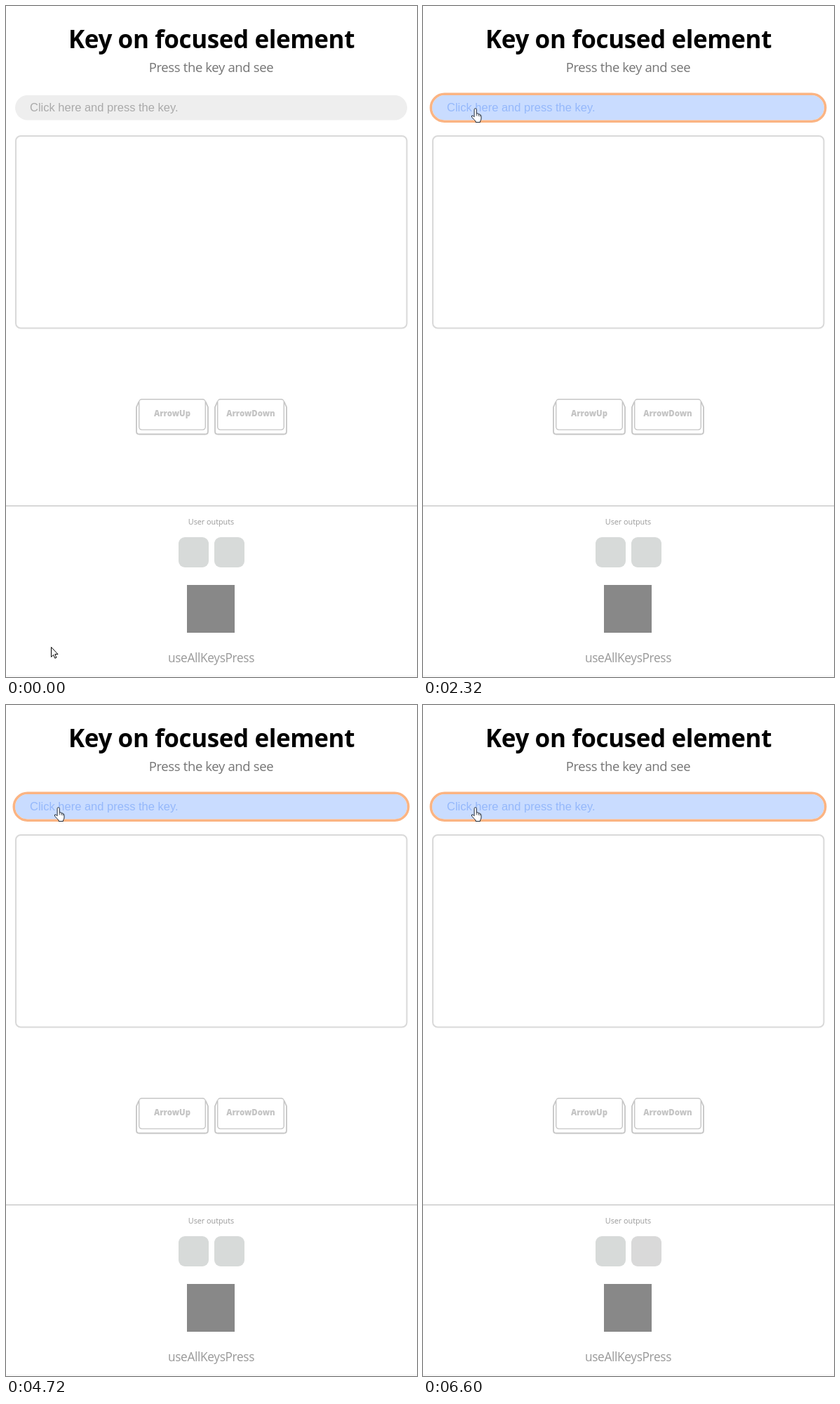
Write an HTML page that moves like this. It is 586 by 955 pixels and loops after 6750 ms.

```html
<!DOCTYPE html>
<html lang="en">
<head>
<meta charset="utf-8">
<title>Key on focused element</title>
<style>
html, body { margin: 0; width: 100%; height: 100%; overflow: hidden; background: #fff; }
svg { display: block; font-family: "Open Sans", "Noto Sans", sans-serif; }
.mid { text-anchor: middle; }
.key { fill: #fff; stroke: #c6c6c6; }
.key text { fill: #c4c4c4; stroke: none; font-weight: 800; font-size: 11.4px; }
.key.on { stroke: #000; }
.key.on text { fill: #000; }
#panel { fill: #fff; stroke: #d9d9d9; stroke-width: 2; }
#panel.on { stroke: #b0b0b0; stroke-width: 1; filter: drop-shadow(0 0 2px #bbb); }
</style>
</head>
<body>
<svg width="586" height="955" viewBox="0 0 586 955">
  <defs>
    <g id="key">
      <path d="M4.5 4L1 12V46.5Q1 50.5 5 50.5H99Q103 50.5 103 46.5V12L99.5 4" stroke-width="1.8"/>
      <rect x="4.7" y=".7" width="94.6" height="43.4" rx="4" stroke-width="1.4"/>
    </g>
    <path id="brow" d="M249 293.5Q268 292 276 281" fill="none" stroke="#d48c00" stroke-width="9.5" stroke-linecap="round"/>
    <path id="eye" d="M252 302L290 318.5V325.5L252 342V335.5L275 322L252 308.5Z"/>
  </defs>

  <text class="mid" x="293" y="59.7" font-size="35" font-weight="700" letter-spacing="-.4">Key on focused element</text>
  <text class="mid" x="292.5" y="94" font-size="18.5" letter-spacing="-.36" fill="#757575">Press the key and see</text>

  <rect id="field" x="13" y="127" width="559" height="35.5" rx="17.75"/>
  <rect id="ring" x="11.25" y="125.25" width="562.5" height="39" rx="19.5" fill="none" stroke="#fbb483" stroke-width="3.5"/>
  <text id="hint" x="34" y="150" font-size="16.5" font-family="Liberation Sans, Arial, sans-serif">Click here and press the key.</text>
  <rect id="caret" x="34" y="136" width="1" height="18"/>

  <rect id="panel" rx="7"/>
  <g id="face">
    <circle cx="292.5" cy="320" r="66" fill="#ffc83d" stroke="#000" stroke-width="9"/>
    <g id="happy">
      <circle cx="270" cy="307" r="8"/>
      <circle cx="315" cy="307" r="8"/>
      <path d="M260 337Q292.5 369 325 337" fill="none" stroke="#000" stroke-width="8" stroke-linecap="round"/>
    </g>
    <g id="sick">
      <use href="#brow"/><use href="#brow" transform="matrix(-1 0 0 1 585 0)"/>
      <use href="#eye"/><use href="#eye" transform="matrix(-1 0 0 1 585 0)"/>
      <path d="M262 366V362A30.5 30 0 0 1 323 362V366H341A13 13 0 0 1 341 391H244A13 13 0 0 1 244 365Z"/>
      <path fill="#137c10" d="M246 382Q239 381 240 375Q242 370 249 372Q253 360 263 361Q265 341 292.5 341Q320 341 322 361Q332 360 336 372Q343 370 345 375Q346 381 339 382Z"/>
      <g id="dots" fill="#16a512"></g>
    </g>
  </g>

  <g id="keys">
    <g class="key" id="up" transform="translate(185 559)"><use href="#key"/><text class="mid" x="52" y="25.2">ArrowUp</text></g>
    <g class="key" id="down" transform="translate(297 559)"><use href="#key"/><text class="mid" x="52" y="25.2">ArrowDown</text></g>
  </g>

  <path d="M0 711.5H586" stroke="#b8b8b8"/>
  <text class="mid" x="292.5" y="738" font-size="10.8" fill="#999">User outputs</text>
  <rect id="outUp" x="246" y="756" width="43" height="43" rx="9"/>
  <rect id="outDown" x="297" y="756" width="43" height="43" rx="9"/>
  <rect x="258" y="824" width="68" height="68" fill="#888"/>
  <text class="mid" x="292.5" y="934" font-size="17.3" letter-spacing="-.35" fill="#999">useAllKeysPress</text>
  <path d="M0 953.5H586" stroke="#f3f3f3"/>

  <path id="arrow" d="M.5 .5V14.5L3.6 11.5L5.8 16.3L7.9 15.4L5.8 10.6H10Z" fill="#fff" stroke="#000"/>
  <g id="hand" fill="#fff" stroke="#1f2937" stroke-linejoin="round">
    <path d="M4.6 12.5V2.4A1.6 1.6 0 0 1 7.8 2.4V8Q10.4 7.3 10.6 8.9Q12.6 8.4 12.8 10Q14.5 9.8 14.5 11.5V15Q14.5 17.4 13 19V20.5H6.6V19Q4 16.5 1.3 13.3Q.3 11.8 1.3 11Q2.6 10.4 4.6 12.9Z"/>
    <path d="M7.8 8V11.5M10.6 9V12M12.8 10V12.5" fill="none" stroke-width=".8"/>
  </g>
</svg>
<script>
const LOOP = 6750, STEP = 1000 / 13, GREY = "#d7dad9", GREEN = "#3dbf27";
const el = id => document.getElementById(id);
const set = (id, attrs) => { for (const k in attrs) el(id).setAttribute(k, attrs[k]); };
const show = (id, on) => { el(id).style.display = on ? "" : "none"; };
const within = (t, a, b) => t >= a && t < b;
const clamp = v => Math.max(0, Math.min(1, v));
const mix = (a, b, k) => `rgb(${a.map((v, i) => Math.round(v + (b[i] - v) * k))})`;

// x offset from the middle, y, radius; mirrored on both sides
const dots = [[6.5, 348, 3], [15, 355, 5.5], [28, 368, 7.5], [11, 374.5, 3.2], [47, 377, 5], [37, 377, 4]];
el("dots").innerHTML = '<circle cx="292.5" cy="364" r="5.5"/>' + dots.map(([x, y, r]) =>
  [-x, x].map(d => `<circle cx="${292.5 + d}" cy="${y}" r="${r}"/>`).join("")).join("");

function arrowAt(n) {
  if (n <= 11) {
    const p = clamp((n - 2) / 9), e = p * p * (3 - 2 * p);
    return [64 - 3 * e - 45 * Math.sin(Math.PI * e), 912 - 590 * e];
  }
  const e = 1 - Math.pow(1 - clamp((n - 11) / 9), 1.49);
  return [61 + 20 * Math.sin(1.9 * e), 322 - 152 * e];
}

const handPath = [[21, 73, 162], [22, 72.5, 155.5], [23, 72, 152], [24, 71, 149], [26, 68.5, 147], [28, 68.5, 145]];
const handAt = n => handPath.filter(p => p[0] <= n).pop().slice(1);
const caretOn = [[2700, 3160], [3790, 4340], [4890, 5350], [5900, 6430]];

function draw(t) {
  const n = Math.floor((t + 5) / STEP);
  const over = n >= 21;
  show("arrow", !over);
  show("hand", over);
  set(over ? "hand" : "arrow", { transform: `translate(${(over ? handAt(n) : arrowAt(n)).map(v => Math.round(v * 2) / 2)})` });

  const hover = over ? (n === 21 ? .6 : 1) : 0;
  set("field", { fill: mix([238, 238, 238], [201, 220, 255], hover) });
  set("hint", { fill: mix([170, 170, 170], [149, 184, 251], hover) });
  set("ring", { opacity: clamp((n - 27) / 3) });
  show("caret", caretOn.some(r => within(t, ...r)));

  const up = within(t, 3790, 4720), down = within(t, 5420, 6600), on = up || down;
  el("panel").classList.toggle("on", on);
  set("panel", on ? { x: 13.5, y: 184.5, width: 558.5, height: 273 } : { x: 14, y: 185, width: 557.5, height: 273.5 });
  show("face", on);
  show("happy", up);
  show("sick", down);
  set("keys", { transform: `translate(0 ${on ? -1 : 0})` });
  el("up").classList.toggle("on", up);
  el("down").classList.toggle("on", down);
  set("outUp", { fill: up ? GREEN : GREY });
  set("outDown", { fill: down ? GREEN : t >= 6600 ? "#d9d9d9" : GREY });
}

const start = performance.now();
function tick() {
  draw((performance.now() - start) % LOOP);
  requestAnimationFrame(tick);
}
tick();
</script>
</body>
</html>
```
